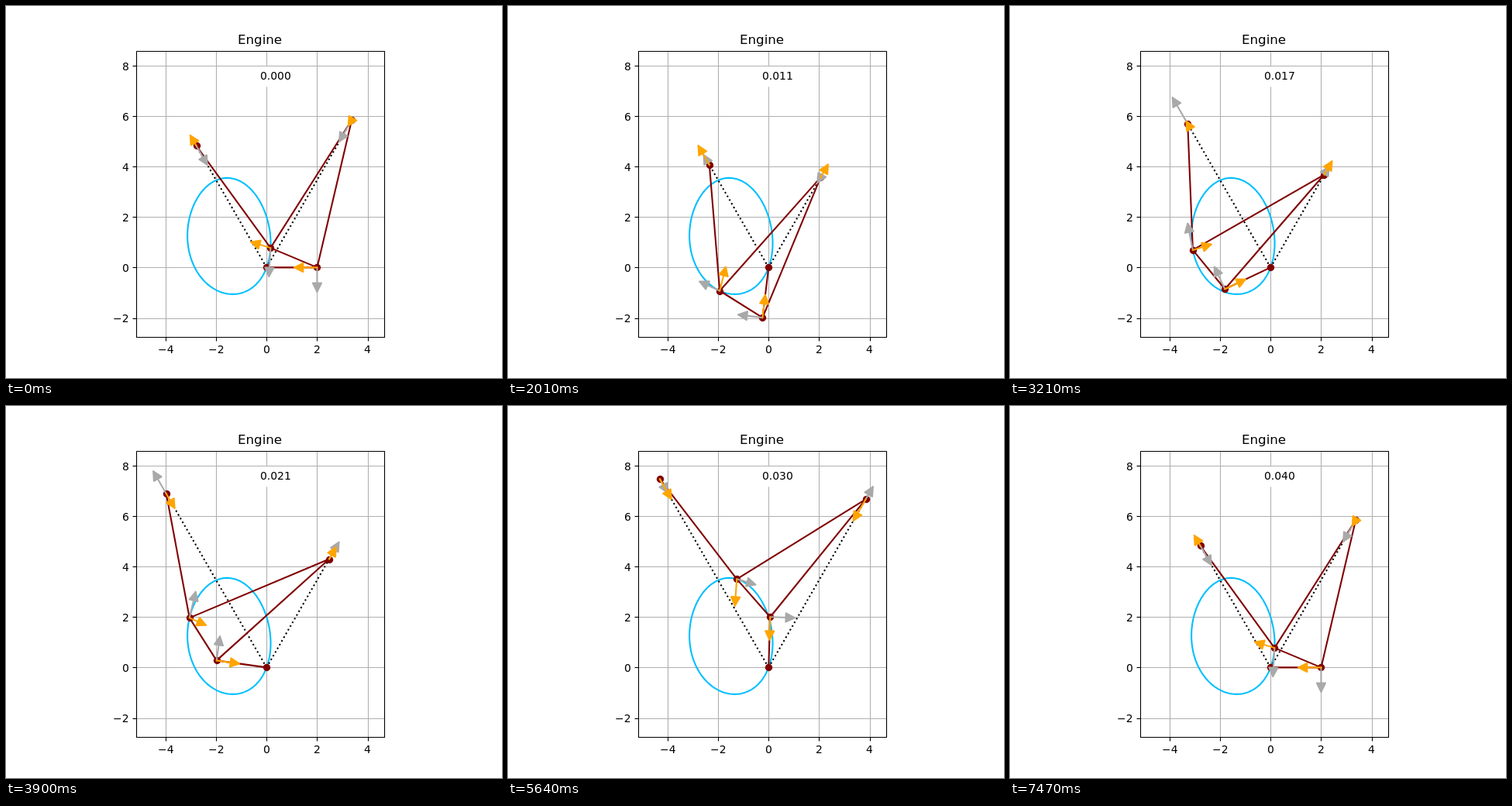
These frames come from a looping animation (640 by 480 pixels, 7.5 s). An HTML page with a canvas:

```html
<!DOCTYPE html>
<html lang="en">
<head>
<meta charset="utf-8">
<title>Engine</title>
<style>
  html, body { margin: 0; width: 100%; height: 100%; overflow: hidden; background: #fff; }
  canvas { display: block; }
</style>
</head>
<body>
<canvas id="stage" width="640" height="480"></canvas>
<script>
const ctx = document.getElementById('stage').getContext('2d');
const FONT = '"DejaVu Sans", Verdana, sans-serif';
const STEP = 30, FRAMES = 250, TAU = Math.PI * 2;
const UNIT = 32.59, X0 = 336.25, Y0 = 337.4;
const BOX = { left: 168.5, right: 488.5, top: 58.5, bottom: 427.5 };
const CRANK = 2, ROD = 6, LINK = 2, SLAVE = 5;
const KNUCKLE = Math.acos(1 / 6);
const RIGHT = [Math.cos(Math.PI / 3), Math.sin(Math.PI / 3)];
const LEFT = [-RIGHT[0], RIGHT[1]];
const VEL_SCALE = 1.02, ACC_SCALE = 0.955;

const px = ([x, y]) => [X0 + x * UNIT, Y0 - y * UNIT];
const snap = v => Math.round(v) + 0.5;

// Point on the ray `axis` at distance `len` from p (outer solution).
function slide(p, axis, len) {
  const along = p[0] * axis[0] + p[1] * axis[1];
  const off = p[0] * axis[1] - p[1] * axis[0];
  const s = along + Math.sqrt(len * len - off * off);
  return [s * axis[0], s * axis[1]];
}

// Crank pin, right piston, knuckle joint, left piston.
function pose(phi) {
  const pin = [CRANK * Math.cos(phi), -CRANK * Math.sin(phi)];
  const right = slide(pin, RIGHT, ROD);
  const a = Math.atan2(right[1] - pin[1], right[0] - pin[0]) + KNUCKLE;
  const joint = [pin[0] + LINK * Math.cos(a), pin[1] + LINK * Math.sin(a)];
  return [pin, right, joint, slide(joint, LEFT, SLAVE)];
}

function path(points, color, dash = []) {
  ctx.beginPath();
  points.forEach(p => ctx.lineTo(...px(p)));
  ctx.strokeStyle = color;
  ctx.lineWidth = 2.08;
  ctx.setLineDash(dash);
  ctx.stroke();
  ctx.setLineDash([]);
}

function segment(x1, y1, x2, y2, color) {
  ctx.beginPath();
  ctx.moveTo(x1, y1);
  ctx.lineTo(x2, y2);
  ctx.strokeStyle = color;
  ctx.lineWidth = 1.11;
  ctx.stroke();
}

// `anchor` is 0 for left, 0.5 for centre, 1 for right; the origin sits on whole pixels.
function text(str, x, y, size, anchor) {
  ctx.font = size + 'px ' + FONT;
  ctx.fillStyle = '#000';
  const left = x - anchor * ctx.measureText(str).width;
  ctx.fillText(str, Math.round(left), Math.round(y));
}

function dot(p) {
  const [x, y] = px(p);
  ctx.beginPath();
  ctx.arc(snap(x), snap(y), 4.7, 0, TAU);
  ctx.fillStyle = '#800000';
  ctx.fill();
}

function arrow(p, v, color) {
  const len = Math.hypot(v[0], v[1]) * UNIT;
  if (len < 1e-6) return;
  ctx.save();
  ctx.translate(...px(p));
  ctx.rotate(Math.atan2(-v[1], v[0]));
  ctx.strokeStyle = ctx.fillStyle = color;
  ctx.lineWidth = 2.08;
  ctx.lineJoin = ctx.lineCap = 'round';
  ctx.beginPath();
  ctx.moveTo(0, 0);
  ctx.lineTo(len - 1.8, 0);
  ctx.stroke();
  ctx.beginPath();
  ctx.moveTo(len - 13, -5.56);
  ctx.lineTo(len - 1.8, 0);
  ctx.lineTo(len - 13, 5.56);
  ctx.closePath();
  ctx.fill();
  ctx.stroke();
  ctx.restore();
}

const label = v => (v < 0 ? '\u2212' : '') + Math.abs(v);

function axes(time) {
  const { left, right, top, bottom } = BOX;
  for (let v = -4; v <= 4; v += 2) {
    const x = X0 + v * UNIT, gx = snap(x);
    segment(gx, top, gx, bottom, '#b0b0b0');
    segment(gx, bottom, gx, bottom + 5, '#000');
    text(label(v), x, 448, 13.89, 0.5);
  }
  for (let v = -2; v <= 8; v += 2) {
    const y = Y0 - v * UNIT, gy = snap(y);
    segment(left, gy, right, gy, '#b0b0b0');
    segment(left, gy, left - 5, gy, '#000');
    text(label(v), 158.4, y + 5.85, 13.89, 1);
  }
  ctx.fillStyle = '#fff';
  ctx.fillRect(321.3, 78, 53.3, 26.3);
  ctx.strokeStyle = '#000';
  ctx.lineWidth = 1.11;
  ctx.strokeRect(left, top, right - left, bottom - top);
  text('Engine', 328, 49, 16.67, 0.5);
  text(time.toFixed(3), 328, 95, 13.89, 0);
}

const orbit = Array.from({ length: FRAMES }, (_, i) => pose(TAU * i / (FRAMES - 1))[2]);

function draw(frame) {
  const turn = frame / (FRAMES - 1);
  const phi = TAU * turn, h = 1e-3;
  const now = pose(phi), prev = pose(phi - h), next = pose(phi + h);
  const [pin, right, joint, left] = now;
  const O = [0, 0];

  ctx.fillStyle = '#fff';
  ctx.fillRect(0, 0, 640, 480);
  axes(0.04 * turn);

  path(orbit, '#00bfff');
  const dots = [2.08, 3.44];
  path([O, left], '#000', dots);
  path([O, right], '#000', dots);
  ctx.lineJoin = 'round';
  path([O, pin, right, joint, pin], '#800000');
  path([joint, left], '#800000');
  [O, ...now].forEach(dot);

  // Both vectors are scaled so the crank pin's are about one unit long.
  now.forEach((p, i) => {
    const vel = [0, 1].map(k =>
      VEL_SCALE * (next[i][k] - prev[i][k]) / (2 * h * CRANK));
    arrow(p, vel, '#a9a9a9');
  });
  now.forEach((p, i) => {
    const acc = [0, 1].map(k =>
      ACC_SCALE * (next[i][k] - 2 * p[k] + prev[i][k]) / (h * h * CRANK));
    arrow(p, acc, '#ffa500');
  });
}

const start = performance.now();
function tick() {
  const t = Math.max(0, performance.now() - start);
  draw(Math.floor(t / STEP) % FRAMES);
  requestAnimationFrame(tick);
}
tick();
</script>
</body>
</html>
```
